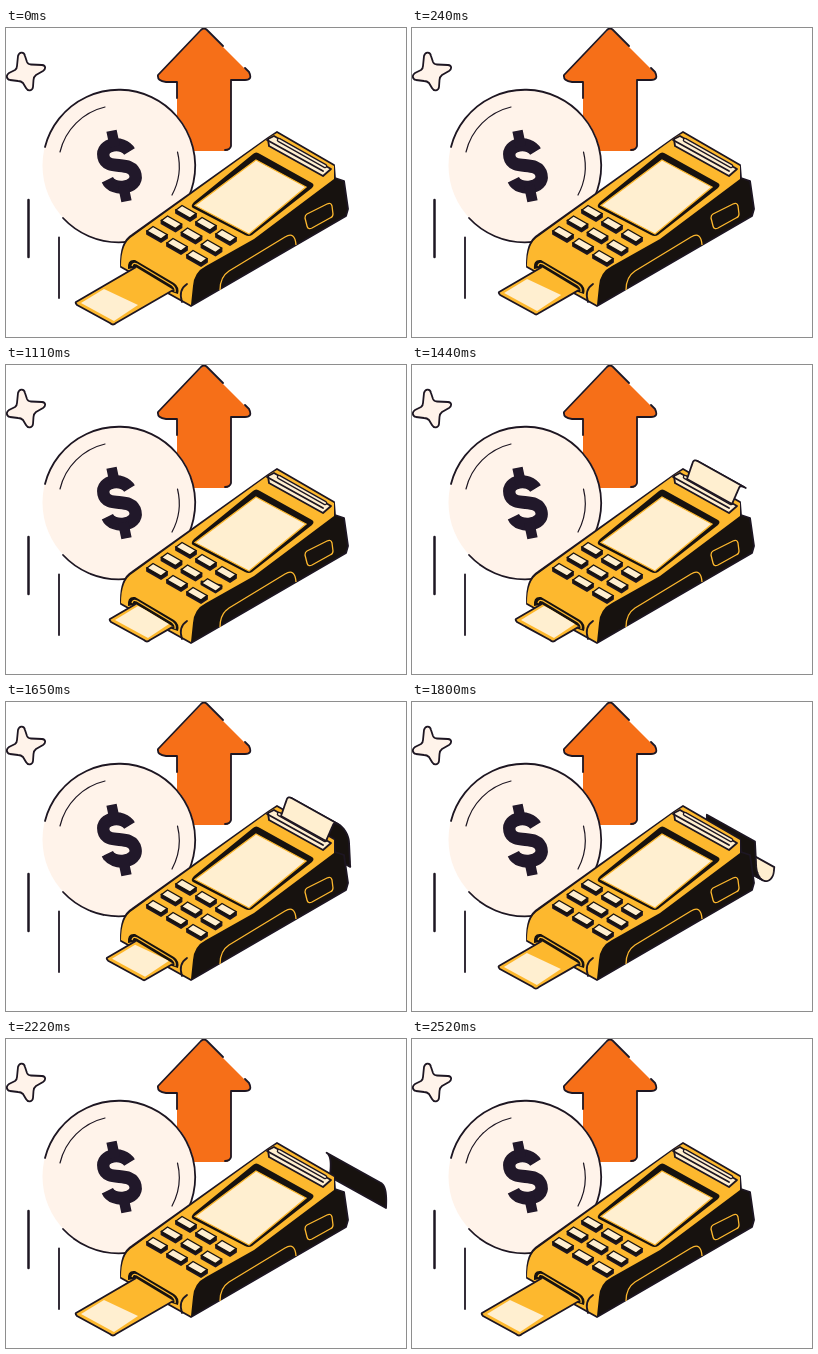
An HTML page that plays this animation: 400 by 309 pixels, repeating every 2.73 s.

```html
<!DOCTYPE html>
<html lang="en">
<head>
<meta charset="utf-8">
<title>Card payment</title>
<style>
html, body { margin: 0; width: 100%; height: 100%; overflow: hidden; background: #fff; }
svg { display: block; width: 400px; height: 309px; }
.dark { fill: #17120f; }
.gold { fill: #fdb82e; }
.cream { fill: #ffefd0; }
.pale { fill: #fff3ea; }
.ink { stroke: #1d1622; stroke-linejoin: round; stroke-linecap: round; stroke-width: 1.8; }
.trim { fill: none; stroke: #fdb82e; stroke-width: 1.3; stroke-linejoin: round; }
.line { fill: none; }
</style>
</head>
<body>
<svg viewBox="0 0 400 309">
  <defs>
    <clipPath id="slot"><path d="M123 235L171 264V309H50V235Z"/></clipPath>
    <!-- Way of the paper's right edge: out of the slot, over the back, up and over again -->
    <path id="track" d="M320 139L327 123C329 117 342 127 343 140L344 160C344 184 361 184 362 168C363 158 364 143 371 143C379 143 381 152 380 169"/>
  </defs>

  <path class="pale ink" d="M12 28C13 24 18 23 19 28L21 34Q22 36.500 25 36.500L36 37C40 37.500 40 41 37 43L30 47Q27.500 49 27.500 52L27 59C26.500 63 22 63.500 20 60L17 55Q15 53 12 53L4 52C0 51 0 47 3 45L9 42Q11 40.500 11 38Z"/>
  <path class="ink line" style="stroke-width:2.500" d="M22.500 172V229"/>
  <path class="ink line" d="M53 209.500V270"/>

  <path d="M198 0L244 46Q245 52 239 52H225V118Q224 123 219 123H171V54H160Q151 53 152 47Z" fill="#f66f18"/>
  <path class="ink line" d="M171 70V54H160Q151 53 152 47L195 2Q198-1 201 2L217 18M239 40L243 44Q247 52 239 52H225V118Q224 122 219 122"/>

  <circle class="pale" cx="113" cy="137.500" r="76.500"/>
  <path class="ink line" d="M39 119A76.300 76.300 0 1 1 57 190"/>
  <path class="ink line" style="stroke-width:1.200" d="M54 124A60.500 60.500 0 0 1 99 79M171.500 124A60.500 60.500 0 0 1 166 167"/>
  <g transform="translate(113 138) rotate(-12) scale(.95 1)" fill="none" stroke="#21182a">
    <path stroke-width="13" d="M14-12C10-24-14-26-14-12C-14 3 15-4 15 12C15 26-12 24-15 11"/>
    <path stroke-width="11" d="M0-36V-20M0 20V36"/>
  </g>

  <g id="paperBehind"></g>

  <path class="dark ink" d="M271 104L328 137 329 150 338 153 342 181 340 188 185 278 115 239Q114 214 126 207L262 110Z"/>
  <path class="gold" d="M264 109L271 105 328 138V151L248 211 200 238Q188 244 187 258L185 277 115 238Q115 215 127 208Z"/>
  <path class="trim" d="M214 262Q214 249 223 243L279 209Q289 203 290 217M301 186L321 176Q325 174 326 178L327 186Q327 189 324 190L306 200Q302 202 301 198L299 190Q299 187 301 186Z"/>
  <path class="dark" d="M247 126Q250 123 254 126L306 155Q309 157 306 160L246 207Q243 209 239 207L187 180Q184 178 188 174Z"/>
  <path class="cream" stroke="#fdb82e" stroke-width="1.300" d="M250 132L300 159 243 206 189 177.500Z"/>
  <g id="keys"></g>

  <path class="cream ink" d="M262 111L268 108 325 141 317 148 263 118Z"/>
  <path class="ink line" d="M261 112L317 143"/>
  <path class="ink line" style="stroke-width:4.500" d="M273 112L319 138"/>
  <path class="line" stroke="#ffefd0" stroke-width="2" stroke-linecap="round" d="M273 112L319 138"/>
  <g id="paperFront"></g>

  <path class="dark" d="M122 241Q121 231 129 232L168 255Q174 259 172 266L166 264 128 240Z"/>
  <path class="line ink" d="M176 274Q172 262 181 256"/>
  <path class="trim" d="M126 238Q127 234 131 236L166 257Q170 260 169 264"/>
  <g clip-path="url(#slot)">
    <g id="card">
      <path class="gold ink" d="M70 274L168 217 207 239 110 295Q107 298 104 295L71 277Q69 275 70 274Z"/>
      <path class="cream" d="M75 275L98 261 132 277 108 293Z"/>
    </g>
  </g>
</svg>
<script>
const LOOP = 2730;
const $ = id => document.getElementById(id);
const ramp = (t, from, to) => Math.min(1, Math.max(0, (t - from) / (to - from)));
const ease = x => (1 - Math.cos(Math.PI * x)) / 2;

// Keypad: rows run down-left, columns down-right
const keyTops = [];
for (let i = 0; i < 9; i++) {
  const row = Math.floor(i / 3), col = i % 3;
  const x = 180 + 20 * col - 14.5 * row, y = 184 + 12 * col + 10.5 * row;
  $("keys").insertAdjacentHTML("beforeend",
    `<g transform="translate(${x} ${y})" style="stroke-width:1.4">
      <path class="dark ink" d="M-10-2V1L4 9 10 5V2Z"/>
      <path class="cream" stroke="#17120f" d="M-10-2L-4-6.500 10 1.500 4 6Z"/>
    </g>`);
  keyTops.push($("keys").lastChild.lastElementChild);
}
const pressedKeys = [0, 6, 5];

// Paper: a strip as wide as the slot that slides along the track
const track = $("track"), trackLength = track.getTotalLength();
const STEPS = 160;
const ribs = Array.from({ length: STEPS + 1 }, (_, i) => {
  const s = i / STEPS, { x, y } = track.getPointAtLength(s * trackLength);
  const grow = 1 + 0.25 * s;
  return { x, y, left: x - 45 * grow, leftY: y - 25 * grow };
});
ribs.forEach((rib, i) => {
  const a = ribs[Math.min(i, STEPS - 1)], b = ribs[Math.min(i + 1, STEPS)];
  rib.faceUp = 45 * (b.y - a.y) < 25 * (b.x - a.x);
});
const firstFold = ribs.findIndex(rib => !rib.faceUp);

function drawPaper(tail, head) {
  const layers = { paperFront: "", paperBehind: "" };
  let from = Math.round(tail * STEPS);
  const end = Math.round(head * STEPS);
  while (from < end) {
    let to = from + 1;
    while (to < end && ribs[to].faceUp === ribs[from].faceUp) to++;
    const run = ribs.slice(from, to + 1);
    const outline = run.map(r => `${r.x} ${r.y}`)
      .concat(run.reverse().map(r => `${r.left} ${r.leftY}`)).join("L");
    const layer = from < firstFold ? "paperFront" : "paperBehind";
    // Farther runs go first, so nearer ones cover them
    layers[layer] = `<path class="ink ${ribs[from].faceUp ? "cream" : "dark"}" d="M${outline}Z"/>` + layers[layer];
    from = to;
  }
  for (const id in layers) $(id).innerHTML = layers[id];
}

function draw(t) {
  const inserted = ease(ramp(t, 0, 480)) - ease(ramp(t, 1560, 2040));
  $("card").setAttribute("transform", `translate(${34 * inserted} ${-20 * inserted})`);

  pressedKeys.forEach((key, i) => {
    const start = 620 + 175 * i;
    const depth = 3 * Math.sin(Math.PI * ramp(t, start, start + 175));
    keyTops[key].setAttribute("transform", `translate(0 ${depth})`);
  });

  drawPaper(1 - (1 - ramp(t, 1650, 2520)) ** 1.7, ease(ramp(t, 1170, 2220)));
}

const start = performance.now();
function tick() {
  draw((performance.now() - start) % LOOP);
  requestAnimationFrame(tick);
}
tick();
</script>
</body>
</html>
```
